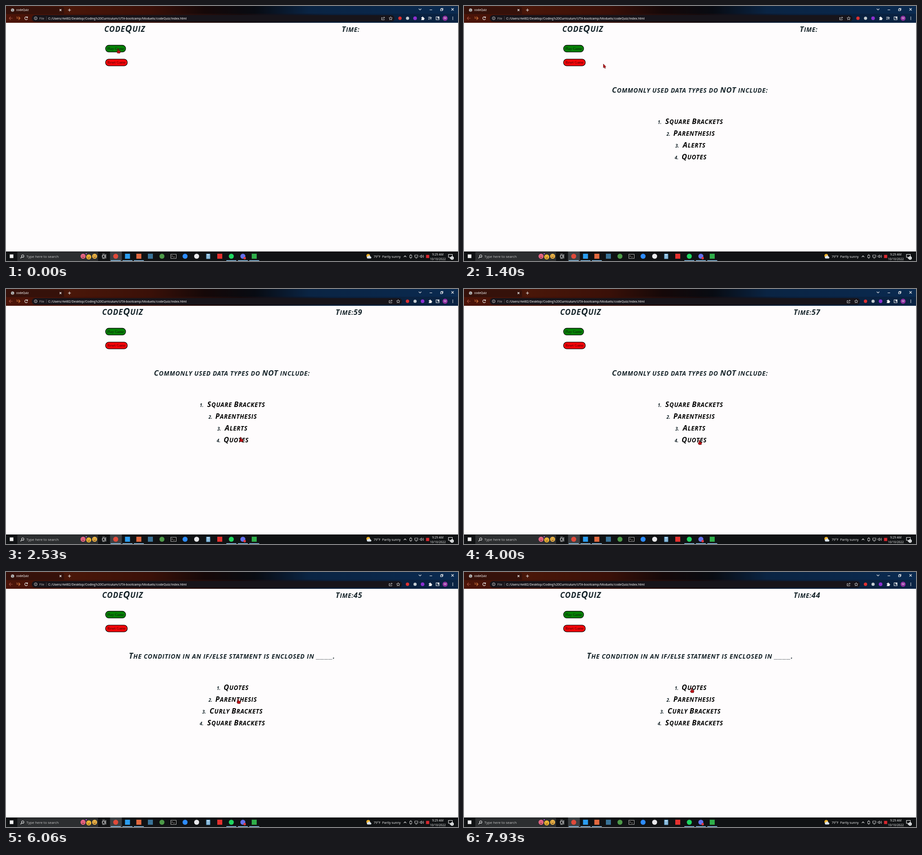
These frames come from a looping animation (997x562 px, 8 s). An HTML page:

```html
<!DOCTYPE html>
<html lang="en">
<head>
<meta charset="utf-8">
<title>codeQuiz</title>
<style>
  html, body { margin: 0; width: 100%; height: 100%; overflow: hidden; background: #fefcfd; }
  svg { display: block; width: 997px; height: 562px; }
  text { font-family: Roboto, "Liberation Sans", sans-serif; fill: #f2f2f2; }
  .hand { font-family: "Open Sans", sans-serif; font-weight: 700; font-style: italic; letter-spacing: .04em; fill: #17252b; }
  .answer { fill: #050505; font-size: 16.2px; text-anchor: middle; }
  .number { font-size: 10px; letter-spacing: 0; text-anchor: end; }
  .small { font-size: .82em; }
  .blank { font-size: .9em; font-family: "Liberation Sans", sans-serif; }
  .button { font-family: "Liberation Serif", serif; font-size: 8.4px; fill: #0d1a0d; }
  .task { font-family: "Open Sans", sans-serif; }
  .line { fill: none; stroke: #f0f0f0; stroke-width: 1.1; }
  .thin { stroke-width: .8; }
</style>
</head>
<body>
<svg viewBox="0 0 997 562">
  <defs>
    <linearGradient id="title">
      <stop offset="0" stop-color="#35100a"/>
      <stop offset=".14" stop-color="#4a1709"/>
      <stop offset=".32" stop-color="#3a1008"/>
      <stop offset=".44" stop-color="#150808"/>
      <stop offset=".55" stop-color="#080b12"/>
      <stop offset=".67" stop-color="#0a2443"/>
      <stop offset="1" stop-color="#0a2a50"/>
    </linearGradient>
    <linearGradient id="tools">
      <stop offset="0" stop-color="#4c1408"/>
      <stop offset=".3" stop-color="#3a1008"/>
      <stop offset=".52" stop-color="#150b0d"/>
      <stop offset=".72" stop-color="#0a1f3a"/>
      <stop offset="1" stop-color="#0a2343"/>
    </linearGradient>
  </defs>

  <rect width="997" height="562" fill="#fefcfd"/>

  <!-- browser -->
  <rect width="997" height="18" fill="url(#title)"/>
  <rect y="17" width="997" height="20" fill="url(#tools)"/>
  <path d="M2 18V6q0-4 4-4H124q4 0 4 4V18z" fill="#35110a"/>
  <circle cx="14.5" cy="9" r="3.6" fill="#c9c9c9"/>
  <path d="M11.5 8l3 1 1-2M13 12l2-2 2 1" fill="none" stroke="#4a4a4a" stroke-width=".9"/>
  <text x="22.5" y="11.3" font-size="6.6">codeQuiz</text>
  <path class="line" d="M118.2 7l4 4m0-4l-4 4M140 5.8v6.4M136.8 9h6.4"/>
  <path class="line" d="M910.5 6l2.8 2.8L916 6M934.5 8.5h5.5M958.5 6.7h3.8v3.8h-3.8zM960 6.5v-1.3h3.8v3.8h-1.3M982.5 5l5 5m0-5l-5 5"/>
  <path d="M14.5 27H7m3.3-3.5L7 27l3.3 3.5" fill="none" stroke="#a3503f" stroke-width="1.1"/>
  <path d="M23 27h8m-3.3-3.5L31 27l-3.3 3.5M23 24l3 1" fill="none" stroke="#d0733a" stroke-width="1.2"/>
  <path class="line" d="M47 25a3.2 3.2 0 1 0 .5 3.3M47.6 23.3v2.5h-2.6"/>
  <rect x="57" y="20" width="800" height="14.5" rx="7.2" fill="#17141a" id="omnibox"/>
  <circle class="line thin" cx="65.5" cy="27" r="3.2"/>
  <path class="line thin" d="M65.5 26.5v2.3M65.5 25v.8"/>
  <text x="73.5" y="29.6" font-size="7" style="fill:#aaa6a6">File</text>
  <path d="M89 23v8" stroke="#5e5555" stroke-width=".8"/>
  <text x="93" y="29.7" font-size="7.25">C:/Users/rk482/Desktop/Coding%20Curriculum/UTA-bootcamp/Moduels/codeQuiz/index.html</text>
  <g id="extensions">
    <path class="line thin" d="M830.5 25.5h-2v5h6v-1.5M830.5 28.5q.5-3 4.5-3m-1.8-2l2 2-2 2"/>
    <path class="line thin" d="M848.5 23.5l1.1 2.4 2.6.3-1.9 1.8.5 2.6-2.3-1.3-2.3 1.3.5-2.6-1.9-1.8 2.6-.3z"/>
    <circle cx="869" cy="27" r="3.7" fill="#df3030"/>
    <circle cx="885.7" cy="27" r="3.5" fill="#c3cbd0"/>
    <circle cx="902.3" cy="27" r="4" fill="#8b2fd0"/>
    <path d="M916 25h2c-.6-2.3 2.6-2.3 2 0h2v2c2-.5 2 2.5 0 2v2h-6v-2c1.8.2 1.8-2.2 0-2z" fill="#f2f2f2"/>
  </g>
  <path id="playlist" class="line" d="M931.5 24.5h6M931.5 27h5M931.5 29.5h3M937.2 30v-4.2h2"/>
  <path class="line" d="M948.7 23.8h6.6v6.4h-6.6z"/>
  <path d="M952 24h3.3v3.5H952z" fill="#f2f2f2"/>
  <circle cx="968.5" cy="27" r="5.7" fill="#8a2a9c"/>
  <text x="968.5" y="29.3" font-size="6.5" text-anchor="middle">M</text>
  <g fill="#f0f0f0"><circle cx="985.5" cy="24.3" r=".9"/><circle cx="985.5" cy="27" r=".9"/><circle cx="985.5" cy="29.7" r=".9"/></g>

  <!-- page -->
  <g id="page">
    <text id="heading" class="hand" y="57" font-size="20.6"></text>
    <text id="clock" class="hand" y="57" font-size="16.5"></text>
    <rect x="219.6" y="86.5" width="44.3" height="14.8" rx="7.2" fill="#058205" stroke="#071007" stroke-width="1.3"/>
    <text class="button" x="223.2" y="96.6">Play Game</text>
    <rect x="219.6" y="117.1" width="48" height="14.8" rx="7.2" fill="#fb0509" stroke="#180505" stroke-width="1.3"/>
    <text class="button" x="223.4" y="127.2" style="fill:#3a0505">Reset Game</text>
  </g>

  <!-- taskbar -->
  <rect y="541" width="997" height="21" fill="#101214"/>
  <rect x="8.3" y="547.5" width="8" height="8" fill="#f4f4f4"/>
  <rect x="25" y="542" width="178" height="20" fill="#2c2e30"/>
  <path class="line" d="M37 548.5a2.6 2.6 0 1 1-.1 5.2a2.6 2.6 0 1 1 .1-5.2M35 553l-3 3"/>
  <text class="task" x="45" y="554.9" font-size="7.8" style="fill:#c6c6c6">Type here to search</text>
  <g id="faces"></g>
  <path class="line" d="M212.5 549.5h5.5v4.5h-5.5zM212.5 547h5.5M212.5 556.5h5.5M220 547v9.5"/>
  <rect x="229.5" y="541" width="26" height="21" fill="#3d4144"/>
  <g id="apps"></g>
  <rect x="363.5" y="547.2" width="12" height="9" fill="#0a0a0a" stroke="#c8c8c8" stroke-width=".9"/>
  <path d="M365.5 550l2 1.3-2 1.3M369 553h3" fill="none" stroke="#eee" stroke-width=".8"/>
  <rect x="441.5" y="546" width="9" height="11.5" rx="1" fill="#5f9fcb"/>
  <path d="M443 548.5h6" stroke="#e8f4fc" stroke-width="2"/>
  <path d="M443 552h6M443 555h6" stroke="#e8f4fc" stroke-width="1.4" stroke-dasharray="1.5 .75"/>
  <circle cx="526.5" cy="555.7" r="2.6" fill="#e23a3f"/>
  <circle cx="799" cy="550.5" r="4" fill="#f6b52c"/>
  <path d="M797.5 556.5a2.5 2.5 0 0 1 .5-4.8 3.4 3.4 0 0 1 6.2.6 2.2 2.2 0 0 1 .3 4.2z" fill="#dbe5ee"/>
  <text class="task" x="811" y="554.6" font-size="7.1">79°F</text>
  <text class="task" x="829.8" y="554.6" font-size="7.1">Partly sunny</text>
  <path class="line" d="M877.5 553.3l2.7-2.7 2.7 2.7"/>
  <path class="line thin" d="M890.5 549.5h4.5v5h-4.5zM891.5 548h2.5M891.5 556h2.5M901.5 549h7v4.5h-7zM903 555.8h4M913 550.5h1.5l2-2v6.5l-2-2H913zM918.3 550q1.3 1.7 0 3.5M920 548.5q2.4 3.2 0 6.5"/>
  <rect x="926.5" y="548.5" width="7" height="7" fill="#d9272e"/>
  <text class="task" x="952.5" y="549.6" font-size="6.6" text-anchor="middle">9:29 AM</text>
  <text class="task" x="952.5" y="559.6" font-size="6.6" text-anchor="middle">10/10/2022</text>
  <path class="line" d="M976 547.5h8.5v6.5h-3l-2 2v-2H976z"/>
  <circle cx="984" cy="555.5" r="3.7" fill="#eceff1"/>
  <text x="984" y="557.7" font-size="6" text-anchor="middle" style="fill:#222">1</text>

  <!-- pointer -->
  <g id="pointer" stroke="#4c0808" stroke-width=".7" stroke-linejoin="round">
    <path id="finger" fill="#c01218" d="M-.9 .4Q0-.6 .9 .4V4l3.6 .8q1 .3 .8 1.5L4.5 10H-1L-3 6.5q.2-1.3 2.1 0z"/>
    <path id="arrow" fill="#c8151a" d="M0 0V8.3L1.9 6.6 3.3 9.7 4.7 9 3.3 6H5.7z"/>
  </g>
</svg>
<script>
const LOOP = 8000, START = 1000, FIRST_TICK = 2000, WIDEN = 2400, WRONG = 5400;
const $ = id => document.getElementById(id);

// Marker lettering: every lower-case letter is a small capital.
const letter = text => text.replace(/([A-Z0-9]+)|(_+)|([^A-Z0-9_]+)/g, (part, big, blank) =>
  big ? part : `<tspan class="${blank ? 'blank' : 'small'}">${part.toUpperCase()}</tspan>`);

// Each answer carries the right edge of its number.
const quiz = [
  { title: 'Commonly used data types do NOT include:', size: 16.8,
    answers: [['Square Brackets', 435.5], ['Parenthesis', 455], ['Alerts', 474.3], ['Quotes', 473]] },
  { title: 'The condition in an if/else statment is enclosed in ____.', size: 17,
    answers: [['Quotes', 473], ['Parenthesis', 455], ['Curly Brackets', 441], ['Square Brackets', 435.5]] }
];

const cards = quiz.map(({ title, size, answers }) => {
  const card = document.createElementNS('http://www.w3.org/2000/svg', 'g');
  card.innerHTML =
    `<text class="hand" x="498.3" y="191" font-size="${size}" text-anchor="middle">${letter(title)}</text>` +
    answers.map(([name, edge], i) => {
      const y = 260 + 26 * i;
      return `<text class="hand number" x="${edge}" y="${y}">${i + 1}.</text>` +
             `<text class="hand answer" x="507.7" y="${y}">${letter(name)}</text>`;
    }).join('');
  $('page').append(card);
  return card;
});
$('heading').innerHTML = letter('codeQuiz');

// Taskbar icons: x, colour, round, running
$('apps').innerHTML = [
  [242, '#e04a3a', 1, 1], [268, '#2a9df0', 0, 1], [293, '#e2693f', 0, 1], [318.5, '#3a7398', 0, 0],
  [344, '#4d9a48', 1, 0], [395, '#2d8cff', 1, 0], [420.5, '#e9e9ec', 1, 0], [471.5, '#e5302e', 0, 0],
  [497, '#1ed760', 1, 1], [522.5, '#6470ee', 1, 1], [547.5, '#2fae4a', 0, 1]
].map(([x, fill, round, open]) =>
  `<rect x="${x - 5.5}" y="546" width="11" height="11" rx="${round ? 5.5 : 0}" fill="${fill}"/>` +
  (open ? `<rect x="${x - 11}" y="560.4" width="22" height="1.6" fill="#8fc4ea"/>` : '')).join('');

$('faces').innerHTML = [[170, 551.5, '#f2688c'], [182.5, 553, '#f5bd35'], [195.5, 551.5, '#f0b848']]
  .map(([x, y, fill]) => `<g transform="translate(${x} ${y})"><circle r="5.5" fill="${fill}"/>
    <path d="M-2.8-1.5h1.5M1.3-1.5h1.5M-2.5 1.5Q0 4 2.5 1.5" fill="none" stroke="#552a18" stroke-width="1.1"/></g>`).join('') +
  '<circle cx="177" cy="546" r="1.3" fill="#b557d8"/>';

// Pointer tip: time, x, y
const path = [
  [0, 247, 94], [60, 246, 94], [660, 230, 91], [930, 229, 90], [1200, 231, 91], [1500, 345, 146],
  [1860, 483, 218], [2250, 512, 300], [2600, 519, 333], [4330, 519, 333], [4750, 516, 306],
  [5130, 512, 280], [6800, 512, 280], [7200, 473, 311], [7600, 496, 266], [7930, 502, 256], [8000, 502, 256]
];

function pointerAt(t) {
  const i = path.findIndex(p => p[0] > t);
  const [t0, x0, y0] = path[i - 1], [t1, x1, y1] = path[i];
  const k = (t - t0) / (t1 - t0);
  return [x0 + (x1 - x0) * k, y0 + (y1 - y0) * k];
}

function overLink(x, y, set) {
  if (x > 219 && x < 268 && (y > 86 && y < 102 || y > 116 && y < 132)) return true;
  if (set < 0 || y < 243) return false;
  const row = quiz[set].answers[Math.floor((y - 243) / 26)];
  return !!row && x > row[1] + 7 && x < 1008 - row[1];
}

// A wrong answer costs ten seconds.
const secondsLeft = t => 60 - Math.floor((t - START) / 1000) - (t >= WRONG ? 10 : 0);

const show = (el, on) => el.setAttribute('visibility', on ? 'visible' : 'hidden');
let shown = '';

function draw() {
  const t = performance.now() % LOOP;
  const set = t < START ? -1 : t < WRONG ? 0 : 1;
  const ticking = t >= FIRST_TICK;
  const label = ticking ? 'Time:' + secondsLeft(t) : 'Time:';
  if (label !== shown) $('clock').innerHTML = letter(shown = label);
  $('clock').setAttribute('x', ticking ? 727 : 740.5);
  $('heading').setAttribute('x', ticking ? 212 : 216.7);
  cards.forEach((card, i) => show(card, i === set));

  const shift = t >= WIDEN ? 16.6 : 0;
  show($('playlist'), !shift);
  $('extensions').setAttribute('transform', `translate(${shift} 0)`);
  $('omnibox').setAttribute('width', 800 + shift);

  const [x, y] = pointerAt(t);
  const link = overLink(x, y, set);
  $('pointer').setAttribute('transform', `translate(${x.toFixed(2)} ${y.toFixed(2)})`);
  show($('finger'), link);
  show($('arrow'), !link);
  requestAnimationFrame(draw);
}
draw();
</script>
</body>
</html>
```
